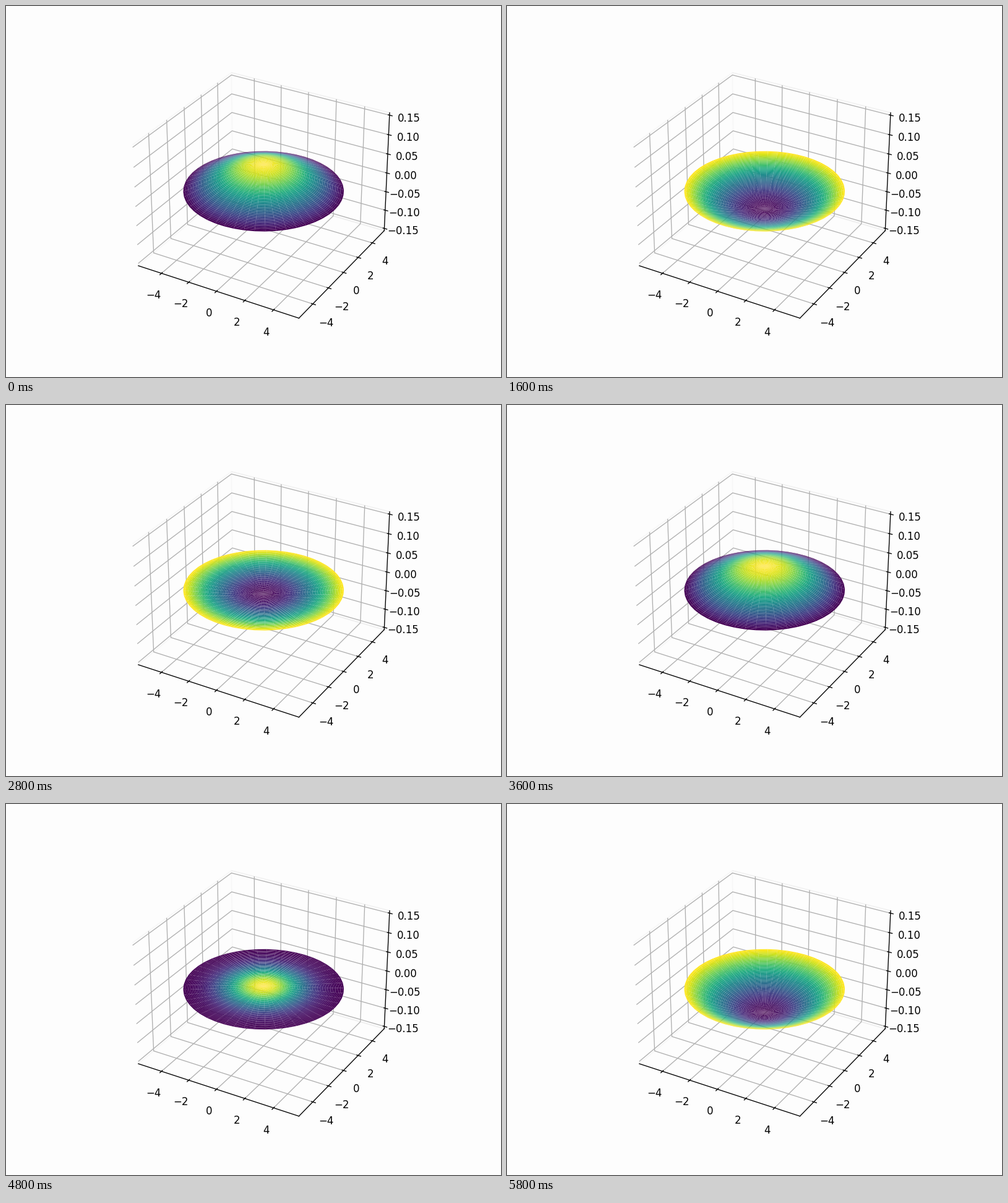
These frames come from a looping animation (800x600 px, 6000 ms). A matplotlib script:

```python
import numpy as np
import matplotlib.pyplot as plt
from matplotlib.animation import FuncAnimation

FRAMES = 30
RADIUS = 5.0
BACK = "#fdfdfd"
PAD = 25 / 24  # small margin beyond the outer ticks

# Drum modes: zero of J0, cosine weight, sine weight
MODES = [
    (2.4048, 0.0640, 0.0095),
    (5.5201, 0.0013, -0.0006),
]


def bessel0(x):
    tau = (np.arange(64) + 0.5) * np.pi / 64
    return np.cos(np.multiply.outer(x, np.sin(tau))).mean(axis=-1)


r = np.linspace(0, RADIUS, 50)
theta = np.linspace(0, 2 * np.pi, 50)
R, THETA = np.meshgrid(r, theta)
X, Y = R * np.cos(THETA), R * np.sin(THETA)
times = np.linspace(0, 20, FRAMES)
shapes = [bessel0(k * r / RADIUS) for k, _, _ in MODES]


def height(t):
    z = np.zeros_like(r)
    for (k, a, b), shape in zip(MODES, shapes):
        w = k / RADIUS
        z += (a * np.cos(w * t) + b * np.sin(w * t)) * shape
    return np.tile(z, (len(theta), 1))


fig = plt.figure(figsize=(800 / 120, 600 / 120), dpi=120, facecolor=BACK)
ax = fig.add_subplot(projection="3d")
ax.set_facecolor(BACK)
ax.set_xlim(-5.5 * PAD, 5.5 * PAD)
ax.set_ylim(-5.5 * PAD, 5.5 * PAD)
ax.set_zlim(-0.15 * PAD, 0.15 * PAD)
ax.set_xticks(np.arange(-4, 5, 2))
ax.set_yticks(np.arange(-4, 5, 2))
ax.set_zticks(np.arange(-3, 4) * 0.05)
for axis in (ax.xaxis, ax.yaxis, ax.zaxis):
    axis.pane.fill = False

surface = None


def draw(i):
    global surface
    if surface is not None:
        surface.remove()
    surface = ax.plot_surface(X, Y, height(times[i]), cmap="viridis", linewidth=0)
    return (surface,)


anim = FuncAnimation(fig, draw, frames=FRAMES, interval=200,
                     init_func=lambda: (), repeat=True, repeat_delay=0)
plt.show()
```
